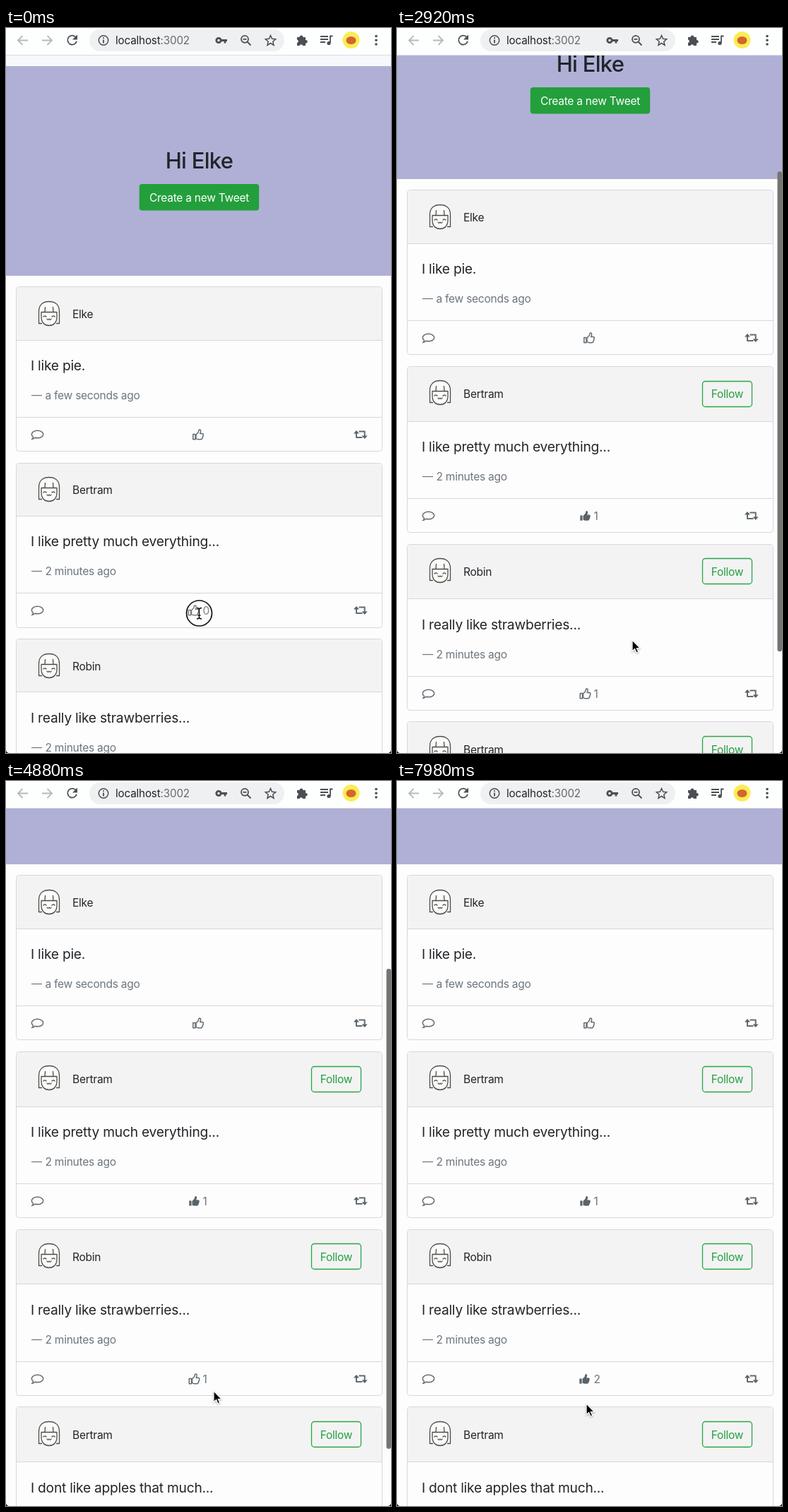
Write an HTML page that moves like this. It is 545 px wide and 1027 px high and loops after 8 s.

```html
<!DOCTYPE html>
<html lang="en">
<head>
<meta charset="utf-8">
<title>Feed</title>
<style>
html, body { margin: 0; width: 100%; height: 100%; overflow: hidden; background: #fdfdfd; }
svg { display: block; }
text { font: 15.5px Inter, Roboto, sans-serif; letter-spacing: -.25px; fill: #212529; }
.mid { text-anchor: middle; }
.hi { font-size: 31px; font-weight: 500; letter-spacing: -.7px; }
.lead { font-size: 19.2px; letter-spacing: -.23px; }
.muted { fill: #6c757d; }
.green { fill: #259f40; }
.url { font-size: 15.2px; letter-spacing: -.15px; }
.line { fill: none; stroke: #d6d6df; }
.icon { fill: none; stroke: #626b72; stroke-width: 1.5; stroke-linejoin: round; }
.solid { fill: #59636a; stroke: none; }
.face { fill: none; stroke: #4c4c46; stroke-width: 1.3; stroke-linecap: round; stroke-linejoin: round; }
.bar { fill: none; stroke: #4b4f54; stroke-width: 1.8; }
.thin { stroke-width: 1.5; }
.thick { stroke-width: 2.8; }
.fill { fill: #4b4f54; stroke: none; }
</style>
</head>
<body>
<svg width="545" height="1027" viewBox="0 0 545 1027">
  <defs>
    <g id="face" class="face">
      <path fill="#fbfbfa" stroke="none" d="M-14.5 14V-3C-14.5-13-8-17 0-17S14.5-13 14.5-3V14Z"/>
      <path d="M-10.500 14H-14.500V-3C-14.500-13-8-17 0-17S14.500-13 14.500-3V14H10.500"/>
      <path d="M-11-2V5C-11 13-6 17 0 17S11 13 11 5V-2ZM-6-2-5.500-9M6-2 5.500-9"/>
      <path d="M-8 4.500q2-2.200 4 0M4 4.500q2-2.200 4 0M-3 7.500q1.500 2.600 3 0q1.500 2.600 3 0"/>
    </g>
    <path id="bubble" d="M2.2 12.5C2.2 11.8 3 11 3 10C1.6 8.8.8 7.6.8 6C.8 3 4.300 .8 9 .8S17.200 3 17.200 6S13.700 11.300 9 11.300C7.800 11.300 6.800 11.200 5.800 10.800C4.500 12 3 12.700 1 12.900Z"/>
    <path id="cuff" d="M.8 7.500H4V14.700H.8Z"/>
    <path id="hand" d="M5 13.700V8L8.300 4.500Q8.600 1 9.900 .9Q11.800 1 11.600 3.300Q11.500 4.800 10.700 6.400H14Q15.400 6.600 15.100 8Q15.600 9.500 14.600 10.600Q14.800 12 13.800 12.700Q13.700 14.700 11.700 14.700H8.500Q6.500 14.600 5 13.700Z"/>
    <g id="retweet">
      <path class="icon" style="stroke-width:2" d="M4 3V10.500H12.500M7.500 2H15.700V9.500"/>
      <path class="solid" d="M0 5 4 .5 8 5ZM11.700 8H19.700L15.700 12.500Z"/>
    </g>
  </defs>

  <g id="page">
    <path fill="#f7f8fb" d="M0 38H545V54H0Z"/>
    <path fill="#b0b0d7" d="M0 54H545V351H0Z"/>
    <text class="hi mid" x="273.5" y="199">Hi Elke</text>
    <rect x="188.7" y="221" width="169.500" height="37.400" rx="4" fill="#239f3c"/>
    <text class="mid" x="273.5" y="245.500" style="fill:#fff">Create a new Tweet</text>
    <g id="feed"></g>
  </g>

  <rect id="thumb" x="538.5" width="6.500" height="680" rx="3.200" fill="#747570"/>

  <g id="toolbar">
    <path fill="#fdfefe" d="M0 0H545V38H0Z"/>
    <path stroke="#dcdde3" d="M0 38.500H545"/>
    <rect x="118" y="2" width="276" height="31" rx="15.500" fill="#eef0f2"/>
    <path class="bar" style="stroke:#b7babd" d="M31 17.500H17M23.500 11 17 17.500 23.500 24M51 17.500H65M58.500 11 65 17.500 58.500 24"/>
    <path class="bar" d="M98.800 13A6.500 6.500 0 1 0 100 18.800"/>
    <path class="fill" d="M101 9.500V16.500H94Z"/>
    <circle class="bar thin" cx="138" cy="17.500" r="6.700"/>
    <path class="bar" d="M138 16.500V21.500M138 13.300V15"/>
    <text class="url" x="155" y="23">localhost<tspan fill="#666b70">:3002</tspan></text>
    <circle class="bar thick" cx="301" cy="17.500" r="3.200"/>
    <path class="bar thick" d="M304 17.500H313M310 17.500V21.500"/>
    <circle class="bar" cx="338" cy="15.800" r="5"/>
    <path class="bar" d="M341.500 19.500 346.500 24.500M335.500 15.800H340.500"/>
    <path class="bar thin" d="M374.500 10.500 376.600 15.300 381.700 15.800 377.800 19.200 379 24.300 374.500 21.500 370 24.300 371.200 19.200 367.300 15.800 372.400 15.300Z"/>
    <path class="fill" d="M412 13H415.500A2.500 2.500 0 1 1 420.500 13H424V17A2.300 2.300 0 1 1 424 21.500V25H420A2.300 2.300 0 0 0 415.600 25H412V21A2.300 2.300 0 0 0 412 16.500Z"/>
    <path class="bar" d="M445 12H456M445 16H456M445 20H452M459 21V11.500H462.500"/>
    <circle class="fill" cx="457" cy="21.500" r="2.600"/>
    <circle cx="488.500" cy="17" r="12" fill="#fbed55"/>
    <ellipse cx="488.500" cy="17.500" rx="7" ry="5.500" fill="#d5652c"/>
    <g class="fill"><circle cx="524" cy="11.500" r="1.800"/><circle cx="524" cy="17.300" r="1.800"/><circle cx="524" cy="23" r="1.800"/></g>
  </g>

  <path d="M0 1023Q.5 1026.500 4 1027H0ZM545 1023Q544.500 1026.500 541 1027H545Z"/>

  <g id="cursor">
    <circle id="ring" r="18" fill="#fff" fill-opacity=".12" stroke="#111" stroke-width="1.700"/>
    <path id="beam" fill="none" stroke="#111" stroke-width="1.400" d="M-3.500-7.500Q0-7.500 0-5Q0-7.500 3.500-7.500M0-5V6M-3.500 8Q0 8 0 5.500Q0 8 3.500 8M-2 3H2"/>
    <path id="arrow" stroke="#fff" stroke-width="1.200" d="M0 0V15.800L3.600 12.500 6 18 8.700 16.900 6.300 11.500H11.200Z" style="filter:drop-shadow(0 1px 1px #0005)"/>
  </g>
</svg>

<script>
const LOOP = 8000;
const $ = id => document.getElementById(id);
const clamp = v => Math.max(0, Math.min(1, v));
const smooth = u => u * u * (3 - 2 * u);
const show = (id, on) => $(id).style.display = on ? '' : 'none';

// Cursor stops: time, x, y
const stops = [
  [0, 273.5, 829], [600, 273.5, 829], [1300, 333, 867], [4700, 333, 867],
  [4880, 294, 864], [5350, 266, 853], [6700, 266, 853], [7300, 268, 882], [LOOP, 268, 882]
];

function card(y, name, lead, age, likes, liked, follow) {
  const top = Math.round(y), grow = follow ? 2.7 : 0;
  const at = offset => Math.floor(y + offset) + .5 - top; // crisp line inside the card
  const edge = at(0), head = at(75.2 + grow), foot = at(184.5 + grow), end = at(232.7 + grow);
  const thumbX = likes === '' ? 264 : likes === 1 ? 258.5 : 257.5;
  const kind = liked ? 'solid' : 'icon';
  return `<g transform="translate(0 ${top})">
    <rect class="line" x="14.5" y="${edge}" width="518" height="${end - edge}" rx="4"/>
    <path fill="#f3f3f3" d="M15 ${head}V${edge + 4}Q15 ${edge + .5} 18.5 ${edge + .5}H528.5Q532 ${edge + .5} 532 ${edge + 4}V${head}Z"/>
    <path class="line" d="M15 ${head}H532M15 ${foot}H532"/>
    <use href="#face" x="61" y="37.500"/>
    <text x="94" y="${follow ? 45 : 44}">${name}</text>
    ${follow ? `<rect x="432.5" y="${at(20.9)}" width="70" height="36" rx="4" fill="none" stroke="#28a745" stroke-width="1.3"/>
    <text class="green mid" x="467.5" y="45">Follow</text>` : ''}
    <g transform="translate(0 ${Math.round(grow)})">
      <text class="lead" x="35" y="118">${lead}</text>
      <path d="M36 153.500H51" stroke="#6c757d" stroke-width="1.200"/>
      <text class="muted" x="55.5" y="159">${age}</text>
      <use class="icon" href="#bubble" x="35.5" y="202.500"/>
      <g class="${kind}"><use href="#cuff" x="${thumbX}" y="201"/><use href="#hand" x="${thumbX}" y="201"/></g>
      <text class="muted" x="278.5" y="214.500">${likes}</text>
      <use href="#retweet" x="492" y="202.500"/>
    </g>
  </g>`;
}

let shown = '';
function feed(t) {
  const loaded = t >= 400, counted = t >= 5900, liked = t >= 7050;
  const key = [loaded, counted, liked].join();
  if (key === shown) return;
  shown = key;
  const step = loaded ? 251.7 : 249.4;
  const cards = [
    ['Bertram', 'I like pretty much everything...', '2 minutes ago', loaded ? 1 : 0, loaded],
    ['Robin', 'I really like strawberries...', '2 minutes ago', counted ? 2 : 1, liked],
    ['Bertram', 'I dont like apples that much...', '2 minutes ago', '', false]
  ];
  $('feed').innerHTML = card(366.9, 'Elke', 'I like pie.', 'a few seconds ago', '', false, false) +
    cards.map((c, i) => card(616.3 + i * step, ...c, loaded)).join('');
}

function scrollAt(t) {
  if (t < 2780) return 13 * clamp((t - 2600) / 80);
  return 13 + 220 * (1 - (1 - clamp((t - 2780) / 620)) ** 3.2);
}

function cursorAt(t) {
  const i = stops.findIndex(s => s[0] > t);
  const [t0, x0, y0] = stops[i - 1], [t1, x1, y1] = stops[i];
  const u = smooth((t - t0) / (t1 - t0));
  return [x0 + (x1 - x0) * u, y0 + (y1 - y0) * u];
}

function draw(now) {
  const t = now % LOOP;
  feed(t);
  const scroll = Math.round(scrollAt(t));
  $('page').setAttribute('transform', `translate(0 ${-scroll})`);
  $('thumb').setAttribute('y', 249 + (scroll - 207) * .654);
  $('thumb').setAttribute('opacity', Math.min(clamp((t - 2780) / 80), clamp((5400 - t) / 250)));
  $('cursor').setAttribute('transform', `translate(${cursorAt(t)})`);
  show('ring', t < 200 || t >= 5650 && t < 5850);
  show('beam', t < 750);
  show('arrow', t >= 750);
}

const start = performance.now();
function tick() {
  draw(performance.now() - start);
  requestAnimationFrame(tick);
}
tick();
</script>
</body>
</html>
```
